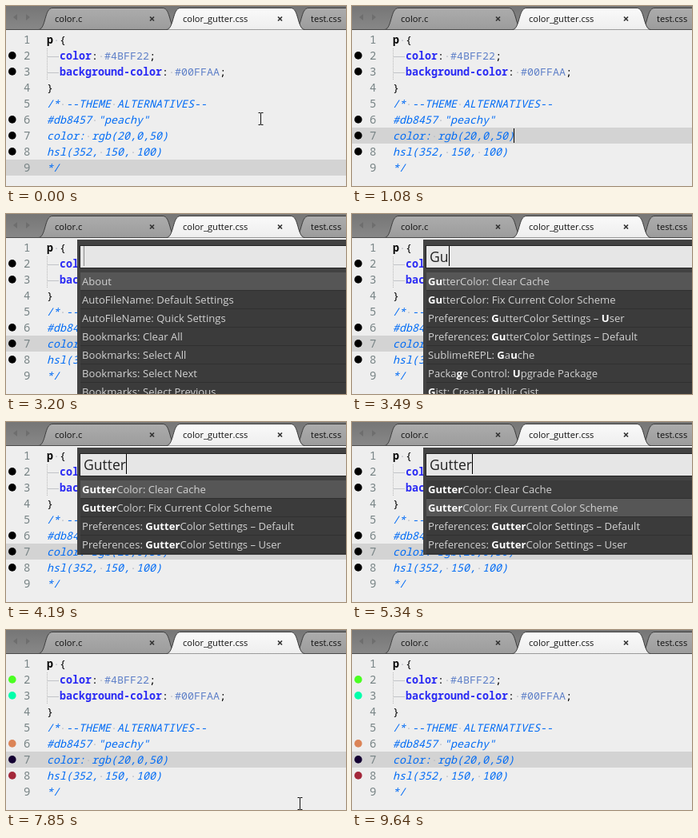
An HTML page that plays this animation: 425x225 px, repeating every 9.8 s.

```html
<!DOCTYPE html>
<html>
<head>
<meta charset="utf-8">
<style>
html, body { margin: 0; width: 100%; height: 100%; overflow: hidden; background: #eee; }
svg { display: block; width: 425px; height: 225px; }
text { white-space: pre; }
.code { font: 13.333px "Noto Sans Mono", monospace; fill: #000; }
.code .num { font-size: 14px; fill: #788486; }
.code .key { font-weight: bold; fill: #2a2af4; }
.code .hex { fill: #5f80c8; }
.code .tag { font-weight: bold; fill: #000; }
.code .note { font-style: italic; fill: #006bf5; }
.code .ws { fill: #b9bcc4; font-style: normal; font-weight: normal; }
.tabs { font: 11.1px "Open Sans", sans-serif; fill: #111; }
.query { font: 17.57px "Open Sans", sans-serif; fill: #222; }
.rows { font: 13.1px "Open Sans", sans-serif; fill: #d2d2d2; }
.rows .hit { font-weight: bold; fill: #fff; }
</style>
</head>
<body>
<svg viewBox="0 0 425 225">
  <defs>
    <linearGradient id="bar" x2="0" y2="1"><stop stop-color="#767676"/><stop offset="1" stop-color="#888"/></linearGradient>
    <linearGradient id="idle" x2="0" y2="1"><stop stop-color="#acacac"/><stop offset="1" stop-color="#9c9c9c"/></linearGradient>
    <linearGradient id="live" x2="0" y2="1"><stop stop-color="#fafafa"/><stop offset="1" stop-color="#eee"/></linearGradient>
  </defs>
  <rect width="425" height="225" fill="#eee"/>
  <rect id="band" width="425" height="20" fill="#d3d3d3"/>
  <path d="M51.5 53V92" stroke="#bbb" stroke-dasharray="1 1"/>
  <path d="M52 63.5h14M52 83.5h14" stroke="#c2c4c8"/>
  <g id="code" class="code"></g>
  <g id="dots"></g>
  <rect id="caret" x="202" y="153" width="1" height="18"/>
  <path id="beam" d="M-3 -7.5h2.5l.5 .5l.5 -.5h2.5M0 -7V7M-3 7.5h2.5l.5 -.5l.5 .5h2.5" fill="none" stroke="#111"/>
  <g id="tabs" class="tabs"></g>
  <g id="palette">
    <rect id="frame" x="89" y="32" width="340" fill="#424242"/>
    <rect x="92.5" y="39.5" width="340" height="28" fill="#e6e6e6" stroke="#222"/>
    <text id="query" class="query" x="97" y="60"></text>
    <rect id="inputCaret" y="40" width="1" height="25"/>
    <g id="rows" class="rows"></g>
  </g>
</svg>
<script>
const LOOP = 9800;
const $ = id => document.getElementById(id);
const span = (cls, s) => `<tspan class="${cls}">${s}</tspan>`;
const dotted = s => s.replace(/ /g, span('ws', '·'));
const note = s => span('note', dotted(s));
const rule = (key, hex) => '  ' + span('key', key) + ':' + span('ws', '·') + span('hex', hex) + ';';

// Editor text
const lines = [
  span('tag', 'p') + span('ws', '·') + '{',
  rule('color', '#4BFF22'),
  rule('background-color', '#00FFAA'),
  '}',
  note('/* --THEME ALTERNATIVES--'),
  note('#db8457 "peachy"'),
  note('color: rgb(20,0,50)'),
  note('hsl(352, 150, 100)'),
  note('*/')
];
$('code').innerHTML = lines.map((s, i) => {
  const y = 47 + 20 * i;
  return `<text class="num" x="22" y="${y}">${i + 1}</text><text x="51" y="${y}">${s}</text>`;
}).join('');

// Gutter marks: line number and colour
const marks = [[2, '#4bff22'], [3, '#00ffaa'], [6, '#db8457'], [7, '#140032'], [8, '#a3283a']];
$('dots').innerHTML = marks.map(([n]) => `<circle cx="7.8" cy="${21.9 + 20 * n}" r="4.8"/>`).join('');

// Tab bar: equal tabs, each overlapping the next
const TAB_X = 41, TAB_STEP = 160, TAB_WIDTH = 172;
function tab(name, i, fill) {
  const a = TAB_X + TAB_STEP * i, b = a + TAB_WIDTH, x = a + 141.5;
  return `<path d="M${a} 29.5C${a + 9} 28 ${a + 7} 2.5 ${a + 17} 2.5H${b - 17}C${b - 7} 2.5 ${b - 9} 28 ${b} 29.5" fill="url(#${fill})" stroke="#3c3c3c"/>` +
    `<text x="${a + 20}" y="20">${name}</text>` +
    `<path d="M${x - 2.5} 13.5l5 5m0 -5l-5 5" stroke="#333" stroke-width="1.7"/>`;
}
$('tabs').innerHTML = '<rect width="425" height="30" fill="url(#bar)"/>' +
  '<path d="M14 10v8l-5 -4zM25 10v8l5 -4z" fill="#6e6e6e"/>' +
  tab('test.css', 2, 'idle') + tab('color.c', 0, 'idle') +
  '<path d="M0 29.5H425" stroke="#4a4a4a"/>' + tab('color_gutter.css', 1, 'live');

// Command palette
const clear = 'GutterColor: Clear Cache', fix = 'GutterColor: Fix Current Color Scheme';
const prefs = 'Preferences: GutterColor Settings – ';
const gutter = [clear, fix, prefs + 'Default', prefs + 'User'];
const gist = 'Gist: Create Public Gist', upgrade = 'Package Control: Upgrade Package';
const packages = 'Preferences: Package Control Settings – Default';
const lists = {
  '': ['About', 'AutoFileName: Default Settings', 'AutoFileName: Quick Settings', 'Bookmarks: Clear All',
    'Bookmarks: Select All', 'Bookmarks: Select Next', 'Bookmarks: Select Previous'],
  G: [clear, fix, prefs + 'User', prefs + 'Default', 'SublimeREPL: Gauche', upgrade, gist],
  Gu: [clear, fix, 'Preferences: *G*utterColor Settings – *U*ser', prefs + 'Default',
    'SublimeREPL: Gauche', upgrade, gist],
  Gut: [...gutter, gist, 'Gist: Update File', packages],
  Gutt: [...gutter, 'Gist: Update Gist', gist, packages]
};

// Marks the typed letters, in one piece or scattered in order
function highlight(s, query) {
  if (s.includes('*')) return s.replace(/\*(.)\*/g, (_, c) => span('hit', c));
  if (!query) return s;
  if (s.includes(query)) return s.replace(query, span('hit', query));
  let n = 0;
  return [...s].map(c =>
    n < query.length && c.toLowerCase() === query[n].toLowerCase() ? (n++, span('hit', c)) : c).join('');
}

let shown = null;
function drawPalette(query, picked) {
  const key = query + picked;
  if (key === shown) return;
  shown = key;
  const list = lists[query] || gutter;
  $('frame').setAttribute('height', 42 + 23 * list.length);
  $('query').textContent = query;
  $('inputCaret').setAttribute('x', 97 + Math.round(query ? $('query').getComputedTextLength() : 0));
  $('rows').innerHTML = list.map((s, i) => {
    const y = 73 + 23 * i;
    return `<rect x="93" y="${y}" width="340" height="23" fill="${i === picked ? '#565656' : '#3b3b3b'}"/>` +
      `<path d="M93 ${y + 22.5}h340" stroke="#303030"/>` +
      `<text x="95" y="${y + 16}">${highlight(s, query)}</text>`;
  }).join('');
}

// Each entry: start time, value
const at = (steps, t) => steps.reduce((v, [start, next]) => t >= start ? next : v, steps[0][1]);
const caretSteps = [[0, 0], [1080, 1], [1640, .6], [1770, .25], [1890, 0], [6180, 1], [6450, .4], [6580, 0],
  [7120, .4], [7240, 1], [7550, .4], [7680, 0], [8100, .4], [8230, 1], [8540, .4], [8660, 0],
  [9100, .3], [9230, .7], [9360, 1], [9640, 0]];
const inputSteps = [[0, 1], [2620, .4], [2770, 0], [3200, .4], [3340, 1], [4630, .4], [4790, 0],
  [5220, .4], [5340, 1], [5750, 0]];
const typing = [[0, 0], [3340, 1], [3490, 2], [3640, 3], [3770, 4], [4050, 5], [4190, 6]];
const beamSteps = [[0, [318.5, 141]], [130, null], [7810, [367.5, 217]], [7950, null]];

function draw(now) {
  const t = now % LOOP;
  const open = t >= 2190 && t < 6180;
  $('band').setAttribute('y', t < 1080 ? 192 : 152);
  $('caret').setAttribute('opacity', at(caretSteps, t));
  const beam = at(beamSteps, t);
  $('beam').style.display = beam ? '' : 'none';
  if (beam) $('beam').setAttribute('transform', `translate(${beam})`);
  [...$('dots').children].forEach((dot, i) => dot.setAttribute('fill', t < 6180 ? '#000' : marks[i][1]));
  $('palette').style.display = open ? '' : 'none';
  if (open) {
    drawPalette('Gutter'.slice(0, at(typing, t)), t < 5340 ? 0 : 1);
    $('inputCaret').setAttribute('opacity', at(inputSteps, t));
  }
}

const start = performance.now();
function tick() {
  draw(performance.now() - start);
  requestAnimationFrame(tick);
}
tick();
</script>
</body>
</html>
```
